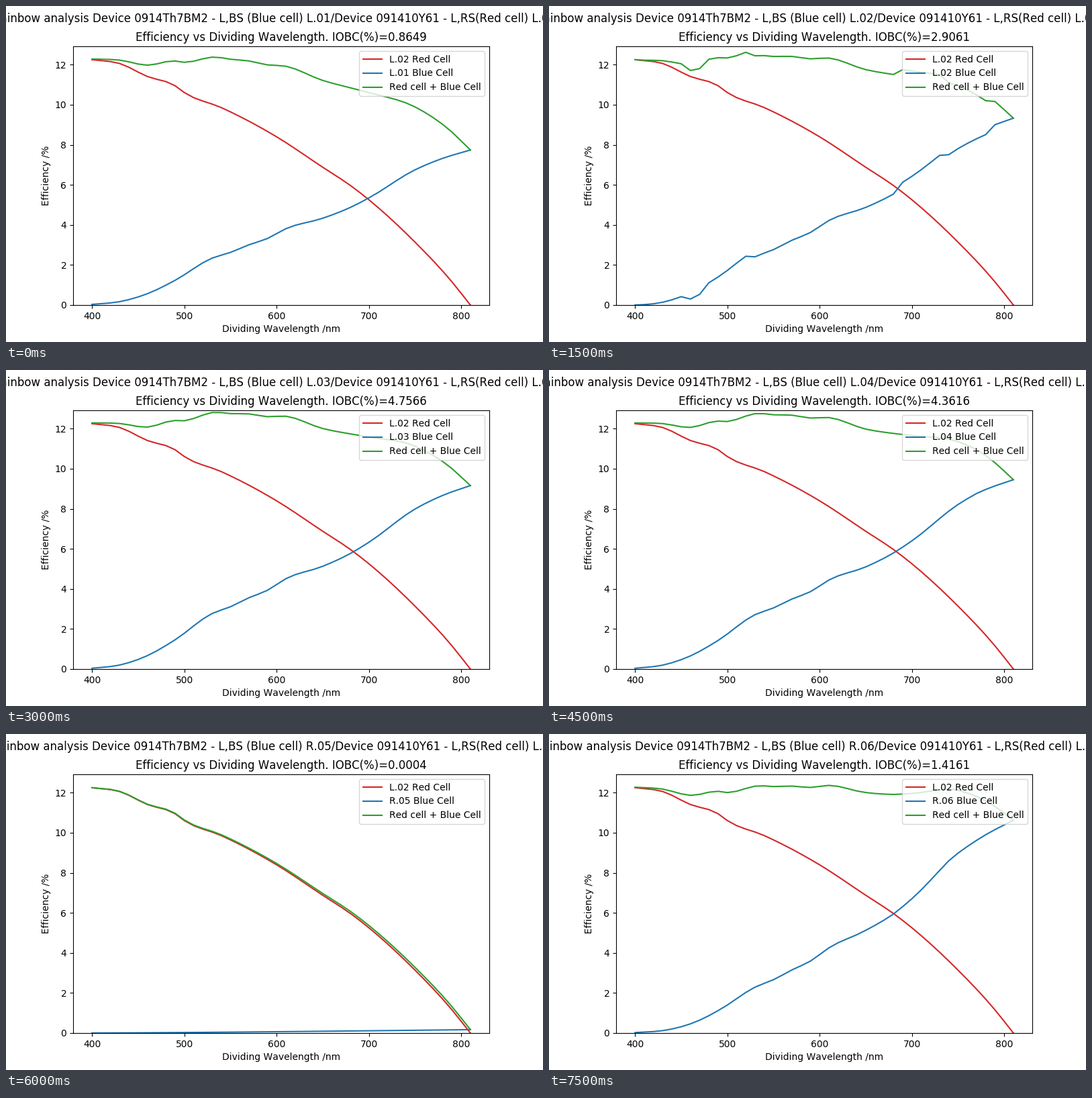
Animation, 800 px wide and 500 px high, one loop 8000 ms. Source, as a matplotlib script:

```python
import numpy as np
import matplotlib.pyplot as plt
from matplotlib.animation import FuncAnimation

STEP_MS = 500
HOLD = 3        # steps each cell stays on screen
STEPS = 16

wave = np.arange(400, 811, 10)


def smooth(*knots):
    """Cubic curve through a few (wavelength, value) points."""
    x, y = np.array(knots, float).T
    slope = np.gradient(y, x)
    i = np.clip(np.searchsorted(x, wave, side="right") - 1, 0, len(x) - 2)
    h = x[i + 1] - x[i]
    t = (wave - x[i]) / h
    s = 1 - t
    return (s * s * (1 + 2 * t) * y[i] + t * t * (1 + 2 * s) * y[i + 1]
            + h * s * t * (s * slope[i] - t * slope[i + 1]))


def ramp(*knots):
    """Straight pieces between (wavelength, value) points."""
    return np.interp(wave, *zip(*knots))


def between(a, b):
    return (wave >= a) & (wave <= b)


red = smooth((400, 12.25), (430, 12.06), (460, 11.41), (490, 10.95),
             (500, 10.61), (540, 9.86), (600, 8.40), (650, 6.88),
             (680, 5.97), (750, 3.14), (790, 1.16), (810, 0))
blue = smooth((400, 0.04), (430, 0.20), (460, 0.67), (490, 1.46),
              (530, 2.77), (550, 3.11), (570, 3.56), (590, 3.93),
              (610, 4.51), (650, 5.13), (680, 5.77), (700, 6.33),
              (750, 7.99), (780, 8.67), (810, 9.16))

# The second cell drops by a fixed amount in three bands.
drop = 0.31 * (between(460, 470) | between(530, 680) | between(740, 780))
uneven = blue + ramp((520, -.06), (690, .09), (810, .17)) - drop

cells = [
    ("L.01", 0.8649, blue * 0.845),
    ("L.02", 2.9061, np.maximum(uneven, 0)),
    ("L.03", 4.7566, blue),
    ("L.04", 4.3616, blue * ramp((400, .975), (600, .983), (650, .994),
                                 (770, 1.035), (810, 1.032))),
    ("R.05", 0.0004, 0.17 * ((wave - 400) / 410) ** 1.3),
    ("R.06", 1.4161, blue * ramp((430, .6), (490, .767), (540, .842),
                                 (650, 1), (680, 1.03), (740, 1.118),
                                 (810, 1.16))),
]

plt.rcParams["font.family"] = "DejaVu Sans"
plt.rcParams["text.kerning_factor"] = 6     # letters set without kerning
fig, ax = plt.subplots(figsize=(8, 5), dpi=100)
fig.subplots_adjust(left=0.125, right=0.9, bottom=0.11, top=0.88)


def draw(step):
    name, iobc, eff = cells[step // HOLD]
    ax.clear()
    ax.plot(wave, red, color="tab:red", label="L.02 Red Cell")
    ax.plot(wave, eff, color="tab:blue", label=f"{name} Blue Cell")
    ax.plot(wave, red + eff, color="tab:green", label="Red cell + Blue Cell")
    ax.set_xlim(379.5, 830.5)
    ax.set_ylim(0, 12.918)
    ax.set_xlabel("Dividing Wavelength /nm")
    ax.set_ylabel("Efficiency /%")
    ax.set_title(f"Efficiency vs Dividing Wavelength. IOBC(%)={iobc:.4f}")
    ax.legend(loc="upper right")
    fig.suptitle(f"Rainbow analysis Device 0914Th7BM2 - L,BS (Blue cell) {name}"
                 "/Device 091410Y61 - L,RS(Red cell) L.02")


anim = FuncAnimation(fig, draw, frames=STEPS, init_func=lambda: draw(0),
                     interval=STEP_MS, repeat=True, repeat_delay=0)
plt.show()
```
